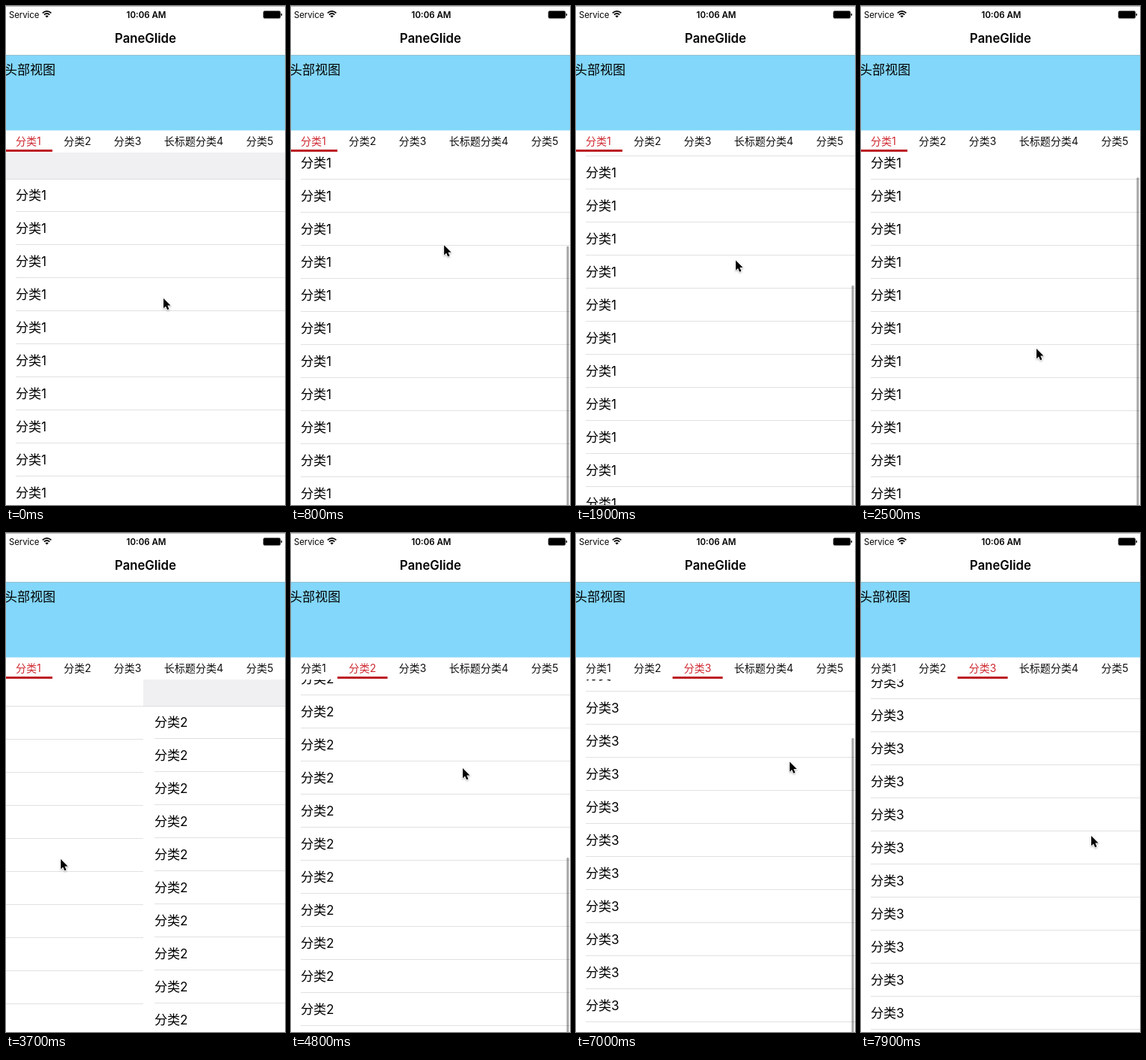
Write an HTML page that moves like this. It is 372 px wide and 664 px high and loops after 8 s.

```html
<!DOCTYPE html>
<html lang="zh">
<head>
<meta charset="utf-8">
<title>Pager</title>
<style>
html, body { margin: 0; width: 100%; height: 100%; overflow: hidden; background: #fff; }
svg { display: block; font-family: Inter, "Noto Sans CJK SC", "Noto Sans CJK", sans-serif; }
.row { font-size: 17px; }
.tab { font-size: 14px; }
.bold { font-weight: 600; text-anchor: middle; }
</style>
</head>
<body>
<svg id="stage" width="372" height="664" viewBox="0 0 372 664"></svg>
<script>
const LOOP = 8000, STEP = 100;
const PAGE = 375, LEFT = -2, TOP = 195, ROW = 44, ROWS = 20, GAP = 30.3;
const VIEW = 664, CONTENT = 954, MAX = CONTENT - VIEW;
const stage = document.getElementById('stage');

function add(parent, tag, attrs, text) {
  const el = document.createElementNS('http://www.w3.org/2000/svg', tag);
  for (const k in attrs) el.setAttribute(k, attrs[k]);
  if (text) el.textContent = text;
  parent.appendChild(el);
  return el;
}
const rect = (parent, x, y, width, height, fill, more) =>
  add(parent, 'rect', { x, y, width, height, fill, ...more });
const label = (parent, x, y, text, more) => add(parent, 'text', { x, y, ...more }, text);

// Lists
const pages = [1, 2, 3].map(n => {
  const page = add(stage, 'g', {});
  rect(page, 0, TOP, PAGE, VIEW, '#fff');
  const list = add(page, 'g', {});
  rect(list, 0, TOP, PAGE, 35, '#f0f0f3');
  rect(list, 0, 230, PAGE, 1, '#dedee1');
  for (let i = 0; i < ROWS; i++) {
    const y = 230 + i * ROW;
    label(list, 15, y + 28, '分类' + n, { class: 'row' });
    rect(list, 15, y + 43, PAGE - 15, 1, '#e1e1e3');
  }
  const bar = rect(page, 369.5, 0, 3, 0, '#000', { rx: 1.5 });
  return { page, list, bar };
});

// Status bar and title
rect(stage, 0, 0, 372, TOP, '#fff');
rect(stage, 0, 0, 372, 1, '#b8b8b8');
label(stage, 4, 15.5, 'Service', { 'font-size': 11.3 });
add(stage, 'path', {
  d: 'M48.7 9.4Q54.5 4.2 60.3 9.4M50.8 11.6Q54.5 8.4 58.2 11.6',
  fill: 'none', stroke: '#000', 'stroke-width': 1.7
});
add(stage, 'path', { d: 'M52.3 13.2Q54.5 11.6 56.7 13.2L54.5 15.6Z' });
label(stage, 187, 15.5, '10:06 AM', { class: 'bold', 'font-size': 11.5 });
rect(stage, 343, 6.5, 23, 10, '#000', { rx: 2, stroke: '#777', 'stroke-width': 0.6 });
rect(stage, 366.6, 10, 1.5, 3, '#000', { rx: 0.7 });
label(stage, 186, 49, 'PaneGlide', { class: 'bold', 'font-size': 16.7 });

// Banner and tabs
rect(stage, 0, 65, 372, 1, '#aaa');
rect(stage, 0, 65.5, 372, 100, '#82d7fa');
label(stage, LEFT, 91, '头部视图', { class: 'row' });
let tabX = 13;
const tabs = ['分类1', '分类2', '分类3', '长标题分类4', '分类5'].map(name => {
  const el = label(stage, tabX, 185, name, { class: 'tab' });
  const x = tabX, width = el.getComputedTextLength();
  tabX += width + GAP;
  return { el, x: x - GAP / 2, width: width + GAP };
});
const line = rect(stage, 0, 191, 0, 3, '#bd2026');

const cursor = add(stage, 'path', {
  d: 'M0 0V13.2L3 10.4L5.1 15.2L7.4 14.2L5.3 9.5H9.5Z',
  stroke: '#fff', 'stroke-width': 1.6, 'paint-order': 'stroke', 'stroke-linejoin': 'round',
  style: 'filter:drop-shadow(0 1px 1px rgba(0,0,0,.3))'
});

// Motion
const part = (t, a, b) => Math.min(1, Math.max(0, (t - a) / (b - a)));
const ease = (t, a, b) => { const u = part(t, a, b); return u * u * (3 - 2 * u); };
const bump = (t, a, b) => Math.sin(Math.PI * part(t, a, b));

const scrolls = [
  { pos: t => 288 * ease(t, 400, 1100) - 245 * ease(t, 1750, 2350), from: 400, to: 2800 },
  { pos: t => 322 * ease(t, 4500, 4800) - 32 * ease(t, 4800, 5200), from: 4500, to: 5450 },
  { pos: t => 273 * ease(t, 6700, 7400), from: 6700, to: 7500 }
];

// Each swipe is a drag followed by a settle to the next page
const swipe = (t, start, release, end, drag) =>
  drag * ease(t, start, release) + (PAGE - drag) * ease(t, release, end);
const paging = t => swipe(t, 3300, 3700, 4050, 190) + swipe(t, 5850, 6000, 6500, 35);

// Pointer stops: time, x, y
const STOPS = [
  [100, 210, 389], [200, 208, 422], [400, 208, 422], [1400, 197, 440], [2500, 234, 456],
  [3300, 263, 440], [3700, 73, 434], [4800, 229, 313], [5850, 294, 428], [6000, 259, 428],
  [7900, 307, 403]
];

function pointer(t) {
  let [, x, y] = STOPS[0];
  for (let i = 1; i < STOPS.length; i++) {
    const [t0, x0, y0] = STOPS[i - 1], [t1, x1, y1] = STOPS[i];
    const u = ease(t, t0, t1);
    x += (x1 - x0) * u;
    y += (y1 - y0) * u;
  }
  x -= 120 * bump(t, 6000, 6500);
  y -= 110 * (bump(t, 400, 1200) + bump(t, 1400, 2300) + bump(t, 6600, 7400));
  return [x, y];
}

function draw(t) {
  const offset = paging(t);
  pages.forEach(({ page, list, bar }, i) => {
    const { pos, from, to } = scrolls[i];
    const s = pos(t), over = Math.max(0, s - MAX);
    page.setAttribute('transform', `translate(${Math.round(LEFT + i * PAGE - offset)} 0)`);
    list.setAttribute('transform', `translate(0 ${-Math.round(s)})`);
    bar.setAttribute('y', TOP + 3 + Math.min(s, MAX) * VIEW / CONTENT + over);
    bar.setAttribute('height', VIEW * VIEW / CONTENT - over);
    bar.setAttribute('opacity', 0.35 * (ease(t, from, from + 100) - ease(t, to, to + 300)));
  });
  const active = Math.floor(offset / PAGE + 0.001);
  tabs.forEach(({ el }, i) => el.setAttribute('fill', i === active ? '#cf2a32' : '#111'));
  line.setAttribute('x', tabs[active].x);
  line.setAttribute('width', tabs[active].width);
  cursor.setAttribute('transform', `translate(${pointer(t)})`);
}

const start = performance.now();
function tick() {
  const t = (performance.now() - start) % LOOP;
  draw(Math.floor(t / STEP) * STEP);
  requestAnimationFrame(tick);
}
tick();
</script>
</body>
</html>
```
